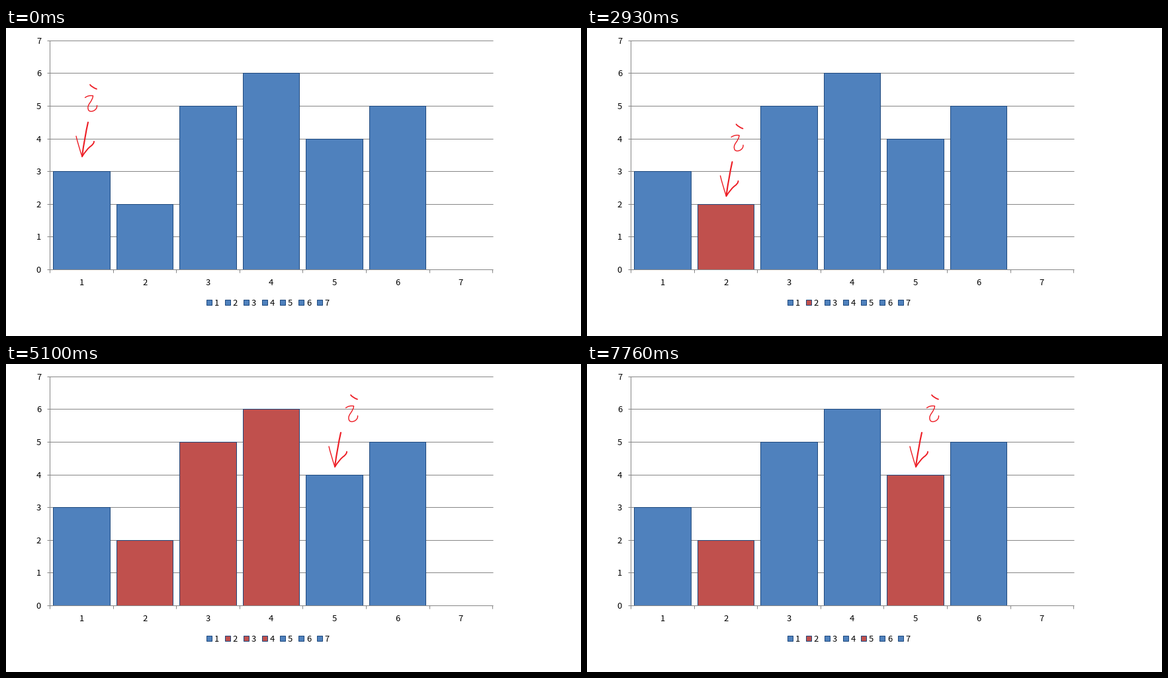
A matplotlib script for the animation above (8000 ms loop, 869 by 467 pixels).

```python
from itertools import groupby

import matplotlib.pyplot as plt
import numpy as np
from matplotlib.animation import FuncAnimation
from matplotlib.patches import PathPatch, Polygon, Rectangle
from matplotlib.path import Path
from matplotlib.transforms import Affine2D

WIDTH, HEIGHT, DPI = 869, 467, 64
PT = 72 / DPI  # points per pixel
LOOP, STEP = 8000, 20

BLUE, RED, GREEN = "#4f81bd", "#c0504d", "#00b050"
EDGE, GRID, INK = "#1f497d", "#868686", "#ed1c24"
ORANGE, YELLOW = "#fac090", "#ffff00"
BLACK, SIGN = "#181818", "#f01010"
SPECIAL = {"empty": "#1a8a1a", "if": "#1f4fc0", "1": "#f05fb4"}

BARS = [3, 2, 5, 6, 4, 5]
STARTS = [0, 760, 2000, 2930, 3790, 4170, 5100, 5650, 6810, 7760]
CODE_X, CHAR = 131, 11.02

fig = plt.figure(figsize=(WIDTH / DPI, HEIGHT / DPI), dpi=DPI, facecolor="white")
ax = fig.add_axes([0, 0, 1, 1])
ax.set(xlim=(0, WIDTH), ylim=(HEIGHT, 0))
ax.axis("off")


def search():
    """Steps of the largest-rectangle search: index, stack, popped bar."""
    stack = []
    for i, height in enumerate(BARS[:5]):
        if not stack or BARS[stack[-1]] > height:
            yield i, stack[:], None
        while stack and BARS[stack[-1]] > height:
            top = stack.pop()
            yield i, stack[:], top
        stack.append(i)
        if i > 0:
            yield i, stack[:], None


def level(value):
    return round(366 - 49.6 * value)


def bar_left(k):
    return round(71 + 95.57 * k)


def bar_right(k):
    return round(157 + 95.4 * k)


def label(x, y, text):
    ax.text(x, y, text, ha="center", va="baseline", color="black",
            family="Noto Sans CJK JP", size=13 * PT)


def line(x0, y0, x1, y1, z=1):
    ax.plot([x0, x1], [y0, y1], color=GRID, lw=PT, zorder=z,
            solid_capstyle="butt")


def box(x, y, w, h):
    return ax.add_patch(Rectangle((x, y), w, h, fc=BLUE, ec=EDGE, lw=PT, zorder=2))


def stroke(width, *points):
    """Pen stroke: a start point followed by pairs of control and end point."""
    codes = [Path.MOVETO] + [Path.CURVE3] * (len(points) - 1)
    return ax.add_patch(PathPatch(Path(points, codes), fc="none", ec=INK,
                                  lw=width * PT, capstyle="round",
                                  joinstyle="round", zorder=6))


def code(text, baseline):
    """Write monospaced code, coloured by the kind of each token."""
    artists, col = [], 0
    for is_word, run in groupby(text, lambda c: c.isalnum() or c == "_"):
        token = "".join(run)
        color = SPECIAL.get(token, BLACK if is_word else SIGN)
        artists.append(ax.text(CODE_X + CHAR * col, baseline, token, color=color,
                               family="DejaVu Sans Mono", size=18.2 * PT, zorder=6,
                               weight="bold" if token == "empty" else "normal"))
        col += len(token)
    return artists


def marker(color, first, last):
    """Highlighter band between two text columns, bulging in the middle."""
    u = np.linspace(0, 1, 30)
    x = CODE_X + CHAR * (first + (last - first) * u)
    bulge = np.sin(np.pi * u)
    top = np.column_stack([x, 434 - 3 * bulge])
    bottom = np.column_stack([x, 456 + 5 * bulge])
    return ax.add_patch(Polygon(np.vstack([top, bottom[::-1]]), fc=color,
                                ec="none", zorder=5))


# chart
for value in range(8):
    line(62, level(value), 736, level(value), 1 if value else 3)
    label(49.5, level(value) + 5, str(value))
line(66, 19, 66, 371, 3)
keys = []
for k in range(7):
    tick = round(66 + 95.6 * (k + 1))
    line(tick, 366, tick, 371, 3)
    label(114.3 + 95.5 * k, 390, str(k + 1))
    label(318.3 + 27.85 * k, 421, str(k + 1))
    keys.append(box(round(303 + 27.85 * k), 412, 8, 8))
bars = [box(bar_left(k), level(v), bar_right(k) - bar_left(k), 366 - level(v))
        for k, v in enumerate(BARS)]
merged = ax.add_patch(Rectangle((0, 0), 1, 1, fc=GREEN, ec="none", alpha=0.93,
                                zorder=4))

# hand-drawn pointer, relative to the arrow tip and the dot of the i
arrow = [
    stroke(2.1, (9, -52), (4, -30), (0, -1)),
    stroke(1.4, (-9, -31), (-6, -18), (0, 0)),
    stroke(1.9, (0, 0), (6, -10), (12, -15), (18, -19), (18, -23)),
]
letter = [
    stroke(1.8, (1, 0), (4, 4), (11, 6.5)),
    stroke(1.4, (-6.5, 19.5), (-1, 15.5), (5.5, 16.8), (5.5, 21), (0.5, 28),
           (-4, 34), (-1, 39), (2, 42), (7.5, 39), (12, 36), (11.5, 31.5)),
]

# code with its highlights; the second line is cut off
listing = code("sum = h[top_idx] * (rect_stk.empty() ? i: (i-rect_stk.top()-1));",
               449.5)
digit = listing[-2]
listing += code("if(max < sum)", 471.5)
listing.append(ax.add_patch(Rectangle((0, 461), WIDTH, 6, fc="white", ec="none",
                                      zorder=7)))
first_case = [marker(ORANGE, 19.7, 36.1), marker(ORANGE, 38, 41.5)]
second_case = [marker(YELLOW, 41.9, 63.2)]


def place(strokes, x, y):
    for part in strokes:
        part.set_transform(Affine2D().translate(x, y) + ax.transData)


def show(artists, visible):
    for artist in artists:
        artist.set_visible(visible)


def point_at(i):
    x = (bar_left(i) + bar_right(i)) / 2 + 1
    y = level(BARS[i]) - (12 if i else 22)
    place(arrow, x, y)
    if y > 100:
        place(letter, x + 11 + 3 * i, y - 109)
    else:  # no room above: write the letter beside the arrow
        place(letter, x + 41, y - 54)


STATES = list(zip(STARTS, search()))


def draw(frame):
    now = (frame + 0.5) * STEP
    i, stack, popped = [state for start, state in STATES if start <= now][-1]
    found = popped is not None
    wide = found and i - popped > 1

    for group in (bars, keys):
        for k, patch in enumerate(group):
            single = k == popped and not wide
            patch.set_facecolor(GREEN if single else RED if k in stack else BLUE)
    if wide:
        left, top = bar_left(popped) - 2, level(BARS[popped]) + 1
        merged.set_bounds(left, top, bar_right(i - 1) + 1 - left, 364 - top)
    merged.set_visible(wide)

    point_at(i)
    show(listing, found)
    show(first_case, found and not stack)
    show(second_case, found and bool(stack))
    digit.set_color("#f05a28" if stack else SPECIAL["1"])
    return []


anim = FuncAnimation(fig, draw, frames=LOOP // STEP, interval=STEP, repeat=True,
                     repeat_delay=0, init_func=lambda: draw(0))
plt.show()
```
